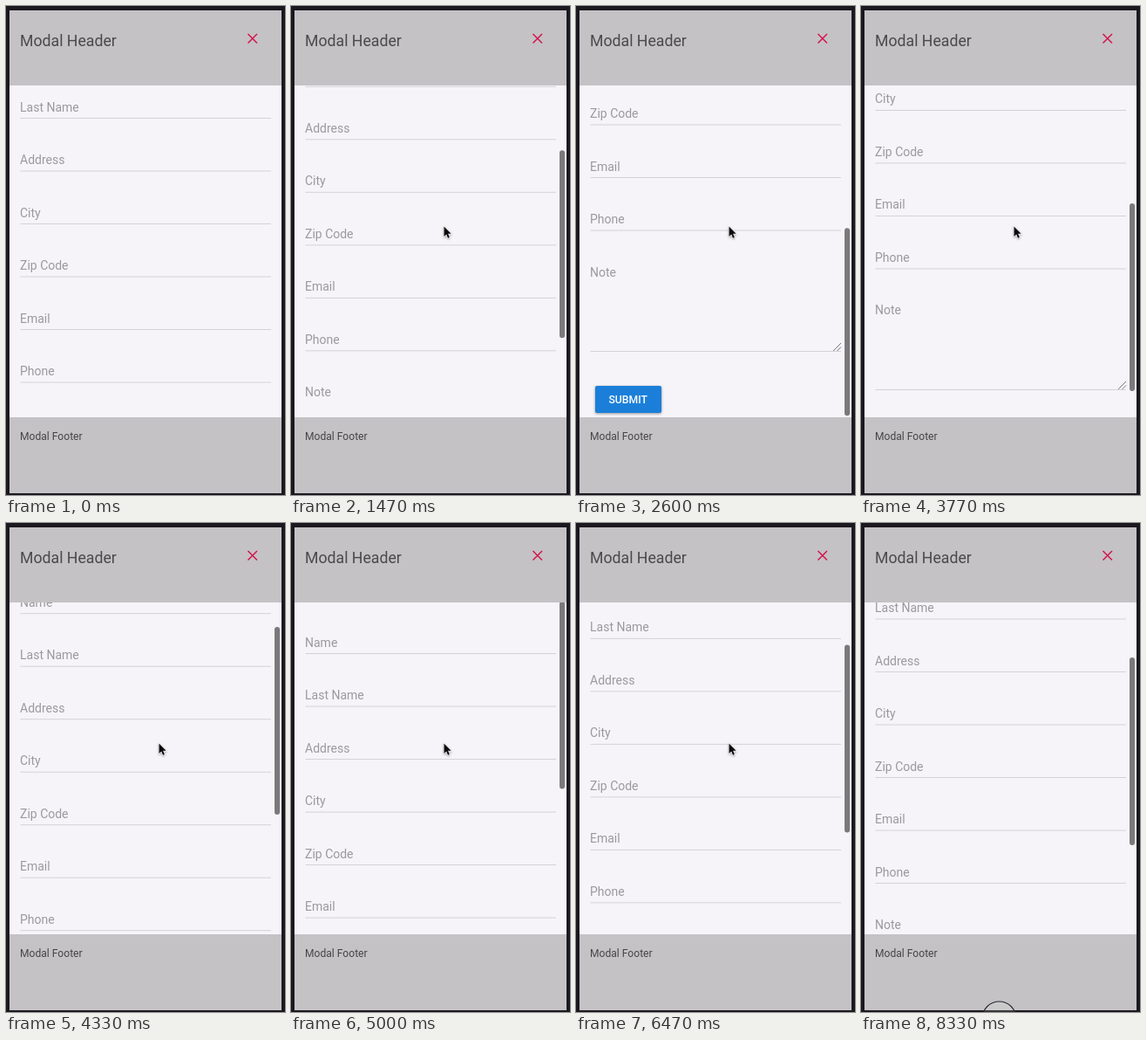
Write an HTML page that moves like this. It is 320 px wide and 560 px high and loops after 8.36 s.

```html
<!DOCTYPE html>
<html lang="en">
<head>
<meta charset="utf-8">
<title>Scrolling modal</title>
<style>
  html, body { margin: 0; height: 100%; overflow: hidden; background: #1b191f; }
  svg { display: block; width: 100%; height: 100%; }
  text { font-family: Roboto, Arial, sans-serif; }
  .label { font-size: 14px; fill: #9b999d; }
  .rule { stroke: #d4d2d6; }
  .button { filter: drop-shadow(0 1.5px 1.5px #0006); }
</style>
</head>
<body>
<svg viewBox="0 0 320 560">
  <defs>
    <clipPath id="view"><rect x="4" y="91" width="312" height="380"/></clipPath>
  </defs>
  <rect width="320" height="560" fill="#1b191f"/>
  <rect x="4" y="5" width="312" height="553" fill="#c4c2c4"/>
  <rect x="4" y="91" width="312" height="380" fill="#f6f4f8"/>

  <g clip-path="url(#view)">
    <g id="form">
      <g id="fields"></g>
      <path class="rule" d="M16.500 645.500H304"/>
      <path d="M295 645l9-9M299.500 645l4.500-4.500" stroke="#77757a"/>
      <rect class="button" x="22" y="685" width="76" height="31" rx="2" fill="#1b7fd9"/>
      <text x="37.500" y="705" font-size="12.200" font-weight="500" fill="#fff">SUBMIT</text>
    </g>
    <rect id="thumb" x="308" width="6" height="215" rx="3" fill="#7b797c"/>
  </g>

  <text x="16" y="46" font-size="17.700" fill="#4a494b">Modal Header</text>
  <text x="16" y="496.500" font-size="12.100" fill="#454446">Modal Footer</text>
  <path d="M277.500 32l10.500 10.500m0-10.500l-10.500 10.500" stroke="#d4154f" stroke-width="1.500"/>

  <circle id="ring" cx="158.500" r="19.500" fill="#fff" fill-opacity=".12" stroke="#2b292d" stroke-width="1.200"/>
  <path id="arrow" d="M0 0V11.500L2.700 9L4.500 13.200L6.400 12.400L4.600 8.300H8.200Z"
        fill="#0b0b0c" stroke="#fff" stroke-width="1.200" paint-order="stroke"
        style="filter:drop-shadow(0 1px 1px #0005)"/>
</svg>
<script>
const LOOP = 8360, PITCH = 60.5;
const $ = id => document.getElementById(id);

$('fields').innerHTML = ['Name', 'Last Name', 'Address', 'City', 'Zip Code', 'Email', 'Phone', 'Note']
  .map((name, i) => {
    const y = i * PITCH;
    const rule = name === 'Note' ? '' : `<path class="rule" d="M16.5 ${144 + y}H304"/>`;
    return `<text class="label" x="16" y="${136 + y}">${name}</text>${rule}`;
  }).join('');

// Scroll keys: time in ms, offset in px, speed in px/ms
const scrollKeys = [
  [930, 76, 0], [1470, 112, .15], [2600, 250, 0],
  [3470, 250, 0], [4330, 40.5, -.22], [4700, 0, 0],
  [5930, 0, .1], [6030, 12, .14], [6470, 72, .11], [6730, 94.5, 0]
];

function scrollAt(t) {
  const next = scrollKeys.findIndex(key => key[0] > t);
  if (next === 0) return scrollKeys[0][1];
  if (next < 0) return scrollKeys.at(-1)[1];
  const [t0, y0, v0] = scrollKeys[next - 1], [t1, y1, v1] = scrollKeys[next];
  const d = t1 - t0, p = (t - t0) / d, q = 1 - p;
  return q * q * (1 + 2 * p) * y0 + p * p * (3 - 2 * p) * y1 + d * p * q * (q * v0 - p * v1);
}

const progress = (t, a, b) => Math.min(1, Math.max(0, (t - a) / (b - a)));
const mix = (a, b, p) => a + (b - a) * p;
const show = (el, on) => el.setAttribute('visibility', on ? 'visible' : 'hidden');
const move = (el, x, y) => el.setAttribute('transform', `translate(${x} ${y})`);

function draw(t) {
  const scroll = scrollAt(t);
  move($('form'), 0, -scroll);
  $('thumb').setAttribute('y', 93 + scroll * .645);
  show($('thumb'), t >= 930);

  const enter = 1 - (1 - progress(t, 30, 270)) ** 2;
  const p = progress(t, 7330, 8130), leave = p * p * (3 - 2 * p);
  move($('arrow'),
    mix(mix(159, 175.5, enter), 158.5, leave),
    mix(mix(525, 252.5, enter), 562, leave));
  show($('arrow'), t >= 30 && t < 8130);

  $('ring').setAttribute('cy', t < 8330 ? 571 : 567.5);
  show($('ring'), t >= 8300);
}

const start = performance.now();
function tick() {
  draw((performance.now() - start) % LOOP);
  requestAnimationFrame(tick);
}
tick();
</script>
</body>
</html>
```
